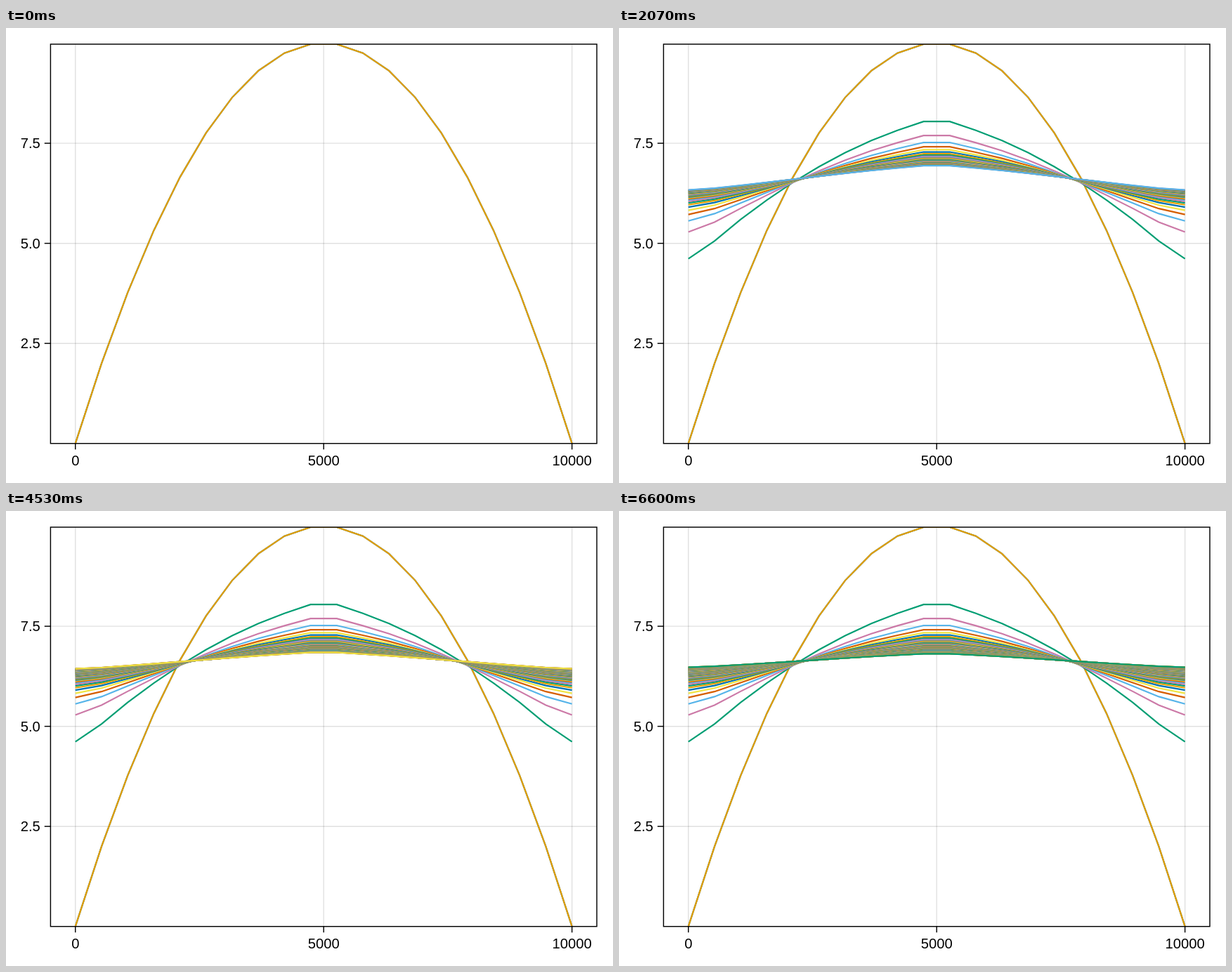
An HTML page with a canvas that plays this animation: 864 px wide and 648 px high, repeating every 6670 ms.

```html
<!DOCTYPE html>
<html lang="en">
<head>
<meta charset="utf-8">
<title>Ice thickness</title>
<style>
  html, body { margin: 0; width: 100%; height: 100%; overflow: hidden; background: #fff; }
  canvas { display: block; }
</style>
</head>
<body>
<canvas id="stage" width="864" height="648"></canvas>
<script>
const ctx = document.getElementById('stage').getContext('2d');
const LOOP = 6670, FRAMES = 100, N = 20;
const COLORS = ['#0072b2', '#e69f00', '#009e73', '#cc79a7', '#56b4e9', '#d55e00', '#f0e442'];
const UNIT = 1.44;
const BOX = { left: 63.4, right: 840.96, top: 23.04, bottom: 591.7 };

// Shallow-ice flow: flux ~ slope^3 * h^5, with no flow through the ends.
const RATE = 0.4e-16 * (910 * 9.8) ** 3 * 8000 / (FRAMES - 1);

function flow(h) {
  const slope = i => h[i + 1] - h[i];
  const steep = h.map((_, i) =>
    (slope(Math.max(i - 1, 0)) + slope(Math.min(i, N - 2))) ** 2 / 4);
  const power = h.map(v => v ** 5);
  const flux = i => i < 0 || i > N - 2 ? 0 :
    slope(i) * (steep[i] + steep[i + 1]) / 2 * (power[i] + power[i + 1]) / 2;
  return h.map((_, i) => RATE * (flux(i) - flux(i - 1)) * (i % (N - 1) ? 1 : 2));
}

function advance(h, steps) {
  const dt = 1 / steps;
  const add = (a, b, s) => a.map((v, i) => v + b[i] * s);
  for (let n = 0; n < steps; n++) {
    const a = flow(h);
    const b = flow(add(h, a, dt / 2));
    const c = flow(add(h, b, dt / 2));
    const d = flow(add(h, c, dt));
    h = h.map((v, i) => v + dt / 6 * (a[i] + 2 * b[i] + 2 * c[i] + d[i]));
  }
  return h;
}

const start = Array.from({ length: N }, (_, i) => {
  const x = i * 10000 / (N - 1);
  return ((7072 - (x - 5000) ** 2) / 9e3 + 2777) / 277.7;
});
const peak = Math.max(...start);
const curves = [start, start];
for (let k = 1; k < FRAMES; k++) {
  curves.push(advance(curves[k], k === 1 ? 1500 : k < 10 ? 150 : 30));
}

const pad = (BOX.right - BOX.left) / 22;
const px = x => BOX.left + pad + x / 10000 * 20 * pad;
const py = y => BOX.bottom - y / peak * (BOX.bottom - BOX.top);

function line(points, color, width) {
  ctx.beginPath();
  points.forEach(p => ctx.lineTo(...p));
  ctx.strokeStyle = color;
  ctx.lineWidth = width;
  ctx.stroke();
}

function label(text, x, y, align) {
  ctx.textAlign = align;
  ctx.fillText(text, x, y);
}

function draw(frame) {
  const { left, right, top, bottom } = BOX;
  const tick = 6 * UNIT, grid = 'rgba(0,0,0,0.12)';
  ctx.fillStyle = '#fff';
  ctx.fillRect(0, 0, 864, 648);
  ctx.fillStyle = '#000';
  ctx.font = `${14 * UNIT}px "Liberation Sans", Arial, sans-serif`;

  for (const x of [0, 5000, 10000]) {
    line([[px(x), top], [px(x), bottom]], grid, UNIT);
    line([[px(x), bottom], [px(x), bottom + tick]], '#000', UNIT);
    label(x, px(x), 623, 'center');
  }
  for (const y of [2.5, 5, 7.5]) {
    line([[left, py(y)], [right, py(y)]], grid, UNIT);
    line([[left - tick, py(y)], [left, py(y)]], '#000', UNIT);
    label(y.toFixed(1), 48.8, py(y) + 7, 'right');
  }

  ctx.save();
  ctx.beginPath();
  ctx.rect(left, top, right - left, bottom - top);
  ctx.clip();
  for (let k = 0; k <= frame + 1; k++) {
    const points = curves[k].map((h, i) => [px(i * 10000 / (N - 1)), py(h)]);
    line(points, COLORS[k % COLORS.length], 1.5 * UNIT);
  }
  ctx.restore();

  ctx.strokeStyle = '#000';
  ctx.lineWidth = UNIT;
  ctx.strokeRect(left, top, right - left, bottom - top);
}

// Frames run at 15 per second, with starts rounded to 10 ms.
const startOf = k => Math.round(k * 20 / 3) * 10;
let shown = -1;

function play(now) {
  const t = now % LOOP;
  let frame = FRAMES - 1;
  while (startOf(frame) > t) frame--;
  if (frame !== shown) draw(shown = frame);
  requestAnimationFrame(play);
}
draw(shown = 0);
requestAnimationFrame(play);
</script>
</body>
</html>
```
